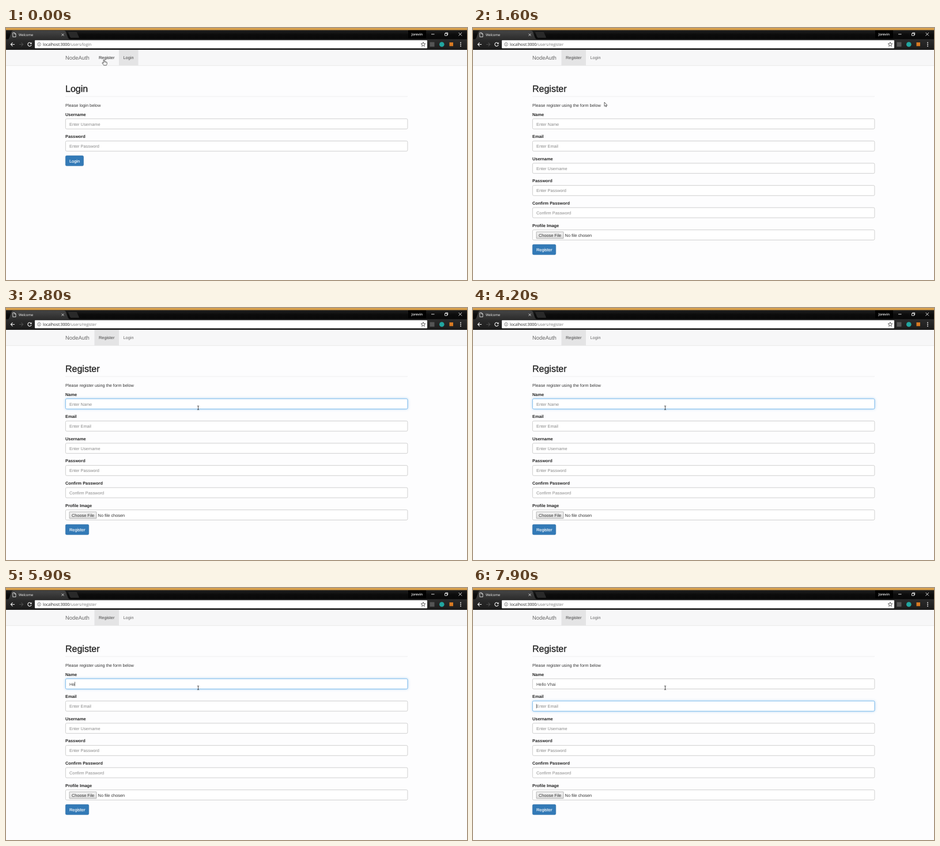
These frames come from a looping animation (800 by 438 pixels, 8000 ms). An HTML page:

```html
<!DOCTYPE html>
<html lang="en">
<head>
<meta charset="utf-8">
<title>Welcome</title>
<style>
html, body { margin: 0; width: 100%; height: 100%; overflow: hidden; background: #fdfdfe; }
svg { display: block; width: 800px; height: 438px; }
text { font: 7.35px "Liberation Sans", Arial, sans-serif; fill: #333; text-rendering: geometricPrecision; white-space: pre; }
.ui { font-family: "Open Sans", "Noto Sans", sans-serif; }
.title { font-size: 6px; fill: #f4f4f4; letter-spacing: -.1px; }
.url { font-size: 7px; fill: #222; letter-spacing: -.07px; }
.url tspan { fill: #777; }
.brand { font-size: 9.4px; fill: #666; }
.head { font-size: 16px; fill: #222; stroke: #222; stroke-width: .35; }
.label { font-weight: bold; fill: #222; }
.hint { fill: #888; }
.typed { fill: #444; }
.white { fill: #fff; stroke: #fff; stroke-width: .15; }
.field { fill: #fff; stroke: #c3c3c3; stroke-width: .8; }
.field.focus { stroke: #66afe9; filter: drop-shadow(0 0 2px rgba(102, 175, 233, .6)); }
.btn { fill: #337ab7; stroke: #2e6da4; stroke-width: .6; }
.line { fill: none; stroke: #f2f2f2; stroke-width: 1.1; }
.caret { fill: #333; }
</style>
</head>
<body>
<svg viewBox="0 0 800 438">
  <defs>
    <linearGradient id="bar" x2="0" y2="1">
      <stop stop-color="#222"/><stop offset=".5" stop-color="#0c0c0c"/><stop offset="1" stop-color="#080808"/>
    </linearGradient>
    <linearGradient id="tab" x2="0" y2="1">
      <stop stop-color="#454545"/><stop offset="1" stop-color="#2c2c2c"/>
    </linearGradient>
    <linearGradient id="tool" x2="0" y2="1">
      <stop stop-color="#2c2c2c"/><stop offset="1" stop-color="#1b1b1b"/>
    </linearGradient>
    <linearGradient id="file" x2="0" y2="1">
      <stop stop-color="#f4f4f4"/><stop offset="1" stop-color="#dcdcdc"/>
    </linearGradient>
  </defs>
  <rect width="800" height="438" fill="#fdfdfe"/>

  <!-- browser window -->
  <rect y="3" width="800" height="17" fill="url(#bar)"/>
  <rect width="800" height="3.6" fill="#d9a04a"/>
  <path d="M3 20Q5 19 6 16.500L9.500 7Q10.500 4.500 12.500 4.500H101Q103 4.500 104 7L107.500 16.500Q108.500 19 111 20Z" fill="url(#tab)"/>
  <path d="M108.500 7.500H122.500L126.500 16.500H113Q112 16.500 111.500 15.500Z" fill="#292929" stroke="#3a3a3a" stroke-width=".5"/>
  <path d="M11.800 8.300H15L17 10.300V15.500H11.800ZM15 8.300V10.300H17" class="line" style="stroke-width:.8"/>
  <text x="22" y="14" class="ui title">Welcome</text>
  <path d="M96.500 9.800L100.500 13.800M100.500 9.800L96.500 13.800" class="line" style="stroke-width:.8"/>
  <rect x="698" y="4" width="31" height="14" fill="#000"/>
  <text x="703.700" y="12.800" class="ui title" style="font-weight:600">Jorevin</text>
  <path d="M738 10.800H743.500M761.500 9.500H765.500V13.200H761.500ZM762.700 9.300V8.200H766.700V12H765.700M785.500 8L791 13.500M791 8L785.500 13.500" class="line" style="stroke-width:.9"/>

  <rect y="19.500" width="800" height="18.500" fill="url(#tool)"/>
  <path d="M15 28.500H8.500M11.500 25.300L8.300 28.500L11.500 31.700" class="line"/>
  <path d="M23 28.500H29.500M26.500 25.300L29.700 28.500L26.500 31.700" class="line" style="stroke:#4c4c4c"/>
  <path d="M43.600 26.500A3.200 3.200 0 1 0 44.100 29.300" class="line"/>
  <path d="M44.500 24.800V28H41.300Z" fill="#f2f2f2"/>
  <rect x="50" y="21.300" width="681" height="13.900" rx="1" fill="#fff"/>
  <circle cx="57.500" cy="28.400" r="2.900" class="line" style="stroke:#555;stroke-width:.7"/>
  <path d="M57.500 28V30M57.500 26.500V27.200" class="line" style="stroke:#555;stroke-width:.8"/>
  <text x="64" y="31" class="ui url">localhost:3000<tspan id="path"></tspan></text>
  <path d="M724 24.500L725 27.200L727.900 27.300L725.600 29.100L726.400 31.900L724 30.300L721.600 31.900L722.400 29.100L720.100 27.300L723 27.200Z" class="line" style="stroke:#444;stroke-width:.8"/>
  <rect x="735.500" y="24.500" width="8" height="8" fill="#555"/>
  <circle cx="756.300" cy="28.500" r="4.300" fill="#22a6a0"/>
  <rect x="769.500" y="25" width="6.500" height="6.500" fill="#d87a22"/>
  <g fill="#f2f2f2"><circle cx="789" cy="25.500" r=".9"/><circle cx="789" cy="28.500" r=".9"/><circle cx="789" cy="31.500" r=".9"/></g>

  <!-- site navigation -->
  <rect y="38" width="800" height="27" fill="#f7f7f8"/>
  <rect y="64.800" width="800" height=".8" fill="#e3e3e3"/>
  <rect id="active" y="38" height="27" fill="#e4e4e5"/>
  <text x="103" y="54.800" class="brand">NodeAuth</text>
  <text x="161" y="54.200" id="navRegister">Register</text>
  <text x="203.500" y="54.200" id="navLogin">Login</text>
  <rect x="103" y="118.600" width="594" height=".8" fill="#ececec"/>

  <g id="login"></g>
  <g id="register"></g>
  <rect id="caret" class="caret" width=".7" height="7.500"/>

  <g id="hand">
    <path d="M-.9 .8Q0 -.5 .9 .8V3.300Q2 2.700 2.500 3.700Q3.500 3.200 4 4.200Q5.200 4 5.200 5.200V7.200Q5 8.700 4.200 9.800H-.3Q-1.500 8 -3 6.200Q-3.200 4.800 -2 5.200L-.9 6.200Z" fill="#fff" stroke="#222" stroke-width=".7"/>
    <path d="M.9 3.300V5M2.500 3.700V5.200M4 4.200V5.400" stroke="#222" stroke-width=".5"/>
  </g>
  <path id="arrow" d="M0 0V7.200L1.600 5.700L2.700 8L3.800 7.500L2.800 5.300H5Z" fill="#fff" stroke="#222" stroke-width=".7"/>
  <path id="beam" d="M-1.600 -3.300H-.5L0 -2.900L.5 -3.300H1.600M0 -2.900V2.900M-1.600 3.300H-.5L0 2.900L.5 3.300H1.600" fill="none" stroke="#222" stroke-width=".8"/>
</svg>
<script>
const LOOP = 8000, ROW = 38.6, TOP = 157.8;
const OPEN = 300, CLICK = 2200, TAB = 7500;
const KEYS = [5700, 5850, 6000, 6150, 6300, 6450, 6700, 6850, 7000, 7150];
const NAME = "Hello Vhai";
// time, x, y of the pointer
const PATH = [[0, 170, 55], [300, 170, 55], [600, 228, 125], [1000, 228, 125],
  [1400, 228, 129], [1800, 228, 129], [2150, 333.5, 173.5], [LOOP, 333.5, 173.5]];

const $ = id => document.getElementById(id);
const text = (x, y, cls, str) => `<text x="${x}" y="${y}" class="${cls}">${str}</text>`;
const show = (el, on) => { el.style.display = on ? "" : "none"; };

function field(label, hint, i) {
  const y = TOP + ROW * i;
  return text(103, y - 5.2, "label", label) +
    `<rect x="103.400" y="${y}" width="593.500" height="17.700" rx="2" class="field"/>` +
    (hint ? text(110, y + 11.7, "hint", hint) : "");
}

function form(title, intro, fields, width) {
  const y = TOP + ROW * fields.length - 13.1;
  return text(103, 110.7, "head", title) + text(103, 137.2, "", intro) +
    fields.map(([label, hint], i) => field(label, hint, i)).join("") +
    `<rect x="103.300" y="${y}" width="${width}" height="17.700" rx="2" class="btn"/>` +
    text(110, y + 11.6, "white", title);
}

const user = ["Username", "Enter Username"], pass = ["Password", "Enter Password"];
$("login").innerHTML = form("Login", "Please login below", [user, pass], 31.2);
$("register").innerHTML = form("Register", "Please register using the form below", [
  ["Name", "Enter Name"], ["Email", "Enter Email"], user, pass,
  ["Confirm Password", "Confirm Password"], ["Profile Image", ""]
], 40.4) +
  '<rect x="110" y="354.300" width="47" height="11.600" rx=".6" fill="url(#file)" stroke="#999" stroke-width=".7"/>' +
  text(114, 362.6, "", "Choose File") + text(159.6, 362.6, "", "No file chosen") +
  text(110, TOP + 11.7, "typed", "");

const boxes = $("register").querySelectorAll(".field");
const nameHint = $("register").querySelector(".hint");
const typed = $("register").querySelector(".typed");

function pointer(t) {
  const i = PATH.findIndex(p => p[0] > t);
  const [t0, x0, y0] = PATH[i - 1], [t1, x1, y1] = PATH[i];
  const k = (t - t0) / (t1 - t0), e = k * k * (3 - 2 * k);
  return [x0 + (x1 - x0) * e, y0 + (y1 - y0) * e];
}

function render(t) {
  const opened = t >= OPEN;
  show($("login"), !opened);
  show($("register"), opened);
  $("path").textContent = opened ? "/users/register" : "/users/login";
  $("active").setAttribute("x", opened ? 153.5 : 196);
  $("active").setAttribute("width", opened ? 42.5 : 33.5);
  $("navRegister").style.fill = opened ? "#444" : "#222";
  $("navLogin").style.fill = opened ? "#666" : "#444";

  const focus = t < CLICK ? -1 : t < TAB ? 0 : 1;
  boxes.forEach((box, i) => box.classList.toggle("focus", i === focus));

  const count = KEYS.filter(k => k <= t).length;
  typed.textContent = NAME.slice(0, count);
  show(nameHint, !count);

  // the caret restarts its blink after every key press
  const last = Math.max(...[CLICK, ...KEYS, TAB].filter(k => k <= t));
  show($("caret"), focus >= 0 && (t - last) % 1060 < 530);
  const end = focus === 0 && count ? typed.getComputedTextLength() : 0;
  $("caret").setAttribute("x", 109.8 + end);
  $("caret").setAttribute("y", TOP + 5.2 + ROW * Math.max(focus, 0));

  const [x, y] = pointer(t);
  const shape = y < 65 && x < 196 ? "hand" : y > TOP ? "beam" : "arrow";
  for (const id of ["hand", "arrow", "beam"]) show($(id), id === shape);
  $(shape).setAttribute("transform", `translate(${x} ${y})`);
}

const start = performance.now();
function tick() {
  render((performance.now() - start) % LOOP);
  requestAnimationFrame(tick);
}
tick();
</script>
</body>
</html>
```
